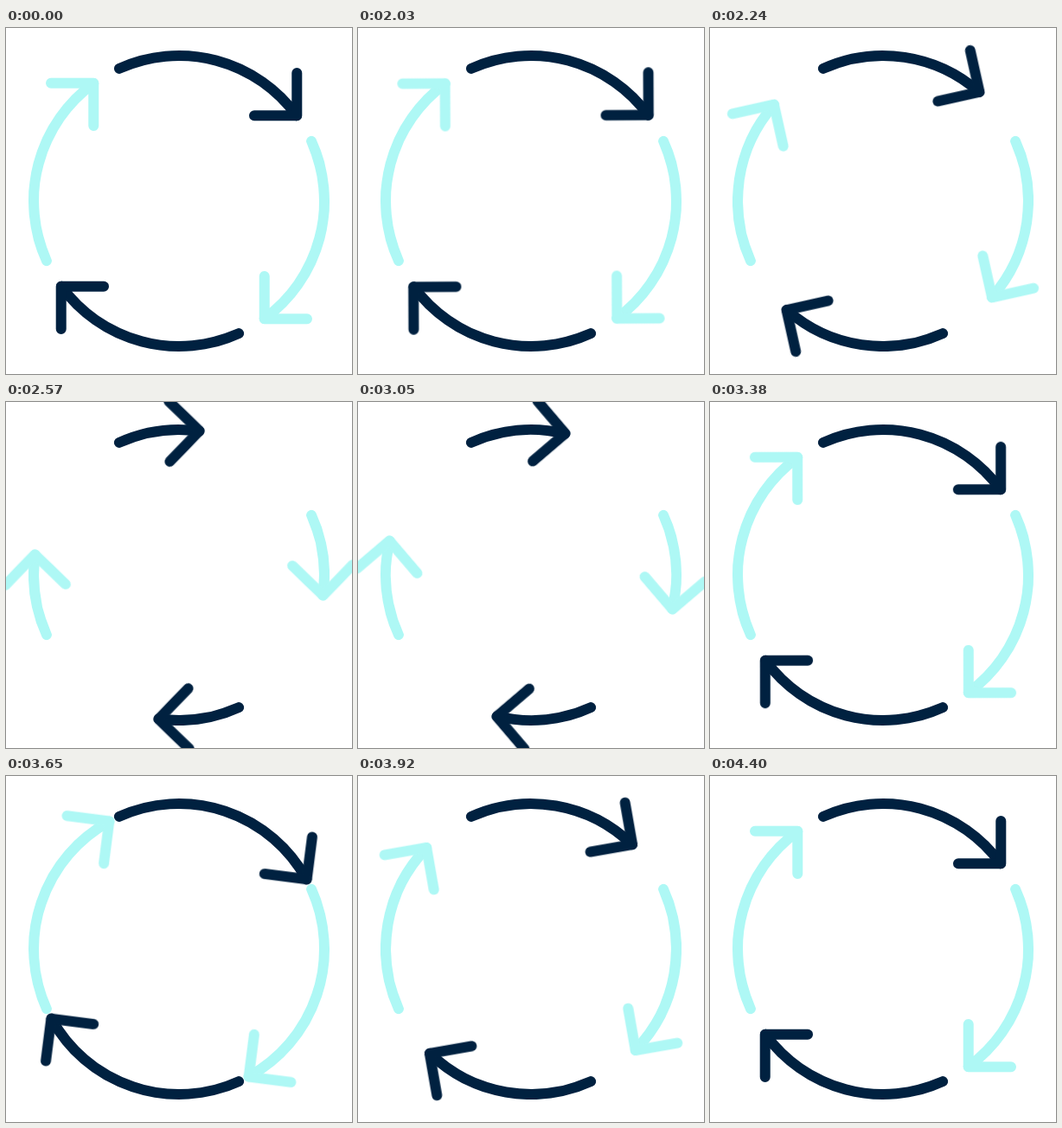
Recreate the animation shown at these times as an HTML page without scripts. Size 400 by 400 pixels, loop 4.43 s.

```html
<!DOCTYPE html>
<html lang="en">
<head>
<meta charset="utf-8">
<title>Circling arrows</title>
<style>
  html, body { margin: 0; width: 100%; height: 100%; overflow: hidden; background: #fff; }
  svg { display: block; width: 100%; height: 100%; }

  use {
    fill: none;
    stroke: currentColor;
    stroke-width: 12;
    stroke-linecap: round;
    stroke-linejoin: round;
    animation: 4430ms cubic-bezier(.33, 0, .67, 1) infinite;
  }
  .head { animation-name: swing; }
  .tail { animation-name: trim; stroke-dasharray: 100 200; }

  .dark { color: #002140; }
  .mint { color: #aef8f5; }

  /* One dash unit is one degree, so head and tail stay joined. */
  @keyframes swing {
    0%, 45.147% { transform: rotate(0deg); }
    63.205% { transform: rotate(-57.5deg); }
    80.519% { transform: rotate(10deg); }
    88.781% { transform: rotate(-10deg); }
    99.323%, 100% { transform: rotate(0deg); }
  }
  @keyframes trim {
    0%, 45.147% { stroke-dashoffset: 21.7; }
    63.205% { stroke-dashoffset: 79.2; }
    80.519% { stroke-dashoffset: 11.7; }
    88.781% { stroke-dashoffset: 31.7; }
    99.323%, 100% { stroke-dashoffset: 21.7; }
  }
</style>
</head>
<body>
<svg viewBox="-200 -200 400 400">
  <defs>
    <path id="arc" pathLength="100" d="M-69.1 -153.1A168 168 0 0 1 162.8 -41.5"/>
    <path id="tip" d="M136.3 -148V-98.7H87"/>
  </defs>
  <g class="dark">
    <use class="tail" href="#arc"/>
    <use class="head" href="#tip"/>
  </g>
  <g class="mint" transform="rotate(90)">
    <use class="tail" href="#arc"/>
    <use class="head" href="#tip"/>
  </g>
  <g class="dark" transform="rotate(180)">
    <use class="tail" href="#arc"/>
    <use class="head" href="#tip"/>
  </g>
  <g class="mint" transform="rotate(270)">
    <use class="tail" href="#arc"/>
    <use class="head" href="#tip"/>
  </g>
</svg>
</body>
</html>
```
